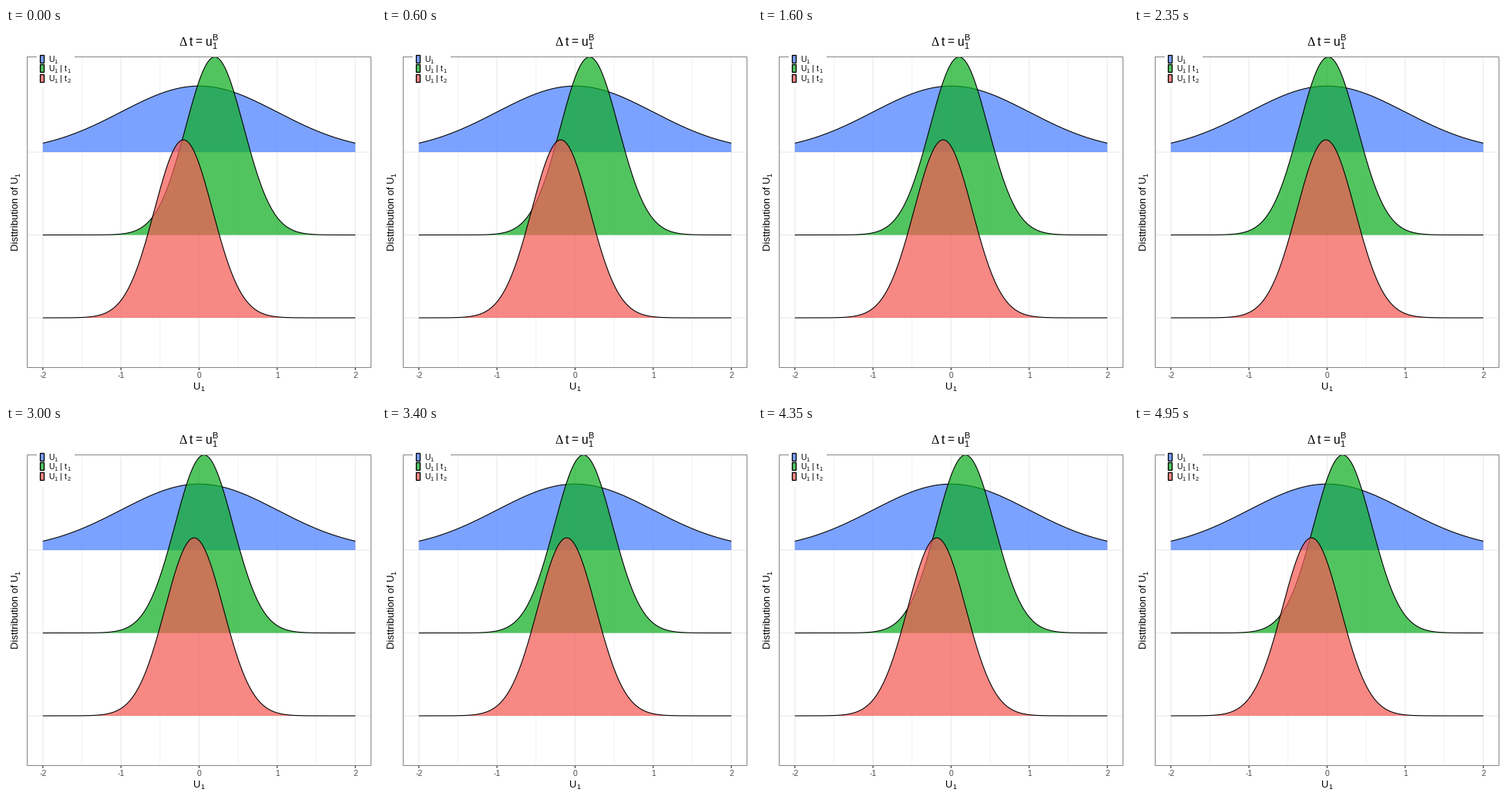
A matplotlib script that plays this animation: 480x480 px, repeating every 5 s.

```python
import numpy as np
import matplotlib.pyplot as plt
from matplotlib.animation import FuncAnimation
from matplotlib.patches import Rectangle

plt.rcParams["font.family"] = "Liberation Sans"

SIZE, DPI = 480, 72          # one point equals one pixel
FRAMES, INTERVAL = 100, 50
LEFT, RIGHT, TOP, BOTTOM = 27.5, 473.5, 37.6, 440.5
STEP = 107.5                 # distance between two baselines
BASELINES = [BOTTOM - (0.6 + n) * STEP for n in (2, 1, 0)]
COLORS = ("#487fff", "#0fae21", "#f55a55")
ALPHA = 0.72
SIGMA = 0.3714               # spread of the two narrow curves
SHIFT = 0.2                  # largest offset of their centres
PEAK = (BASELINES[1] - TOP) * SIGMA   # height of the unit normal

fig = plt.figure(figsize=(SIZE / DPI, SIZE / DPI), dpi=DPI, facecolor="white")
ax = fig.add_axes([0, 0, 1, 1])
ax.set_xlim(0, SIZE)
ax.set_ylim(SIZE, 0)
ax.axis("off")


def px(u):
    return 250.5 + 101.36 * u


def line(x0, y0, x1, y1, color, width, z):
    ax.plot([x0, x1], [y0, y1], color=color, lw=width, zorder=z,
            solid_capstyle="butt", snap=False)


def text(x, y, s, size, color="black", **kw):
    kw = {"ha": "left", "va": "baseline", "zorder": 12, **kw}
    ax.text(x, y, s, fontsize=size, color=color, **kw)


def draw_panel():
    for u in (-2, -1, 0, 1, 2):
        line(px(u), TOP, px(u), BOTTOM, "#ebebeb", 1.26, 1)
        line(px(u), BOTTOM, px(u), BOTTOM + 3.2, "#333333", 1.26, 7)
        text(px(u), 454.3, str(u), 10.4, "#4d4d4d", ha="center")
    for u in (-1.5, -0.5, 0.5, 1.5):
        line(px(u), TOP, px(u), BOTTOM, "#ebebeb", 0.63, 1)
    for y in BASELINES:
        line(LEFT, y, RIGHT, y, "#ebebeb", 1.26, 1)
    # whole numbers snap the border onto single pixel rows
    x, y = int(LEFT), int(TOP)
    ax.add_patch(Rectangle((x, y), int(RIGHT) - x, int(BOTTOM) - y, fill=False,
                           ec="#858585", lw=1, zorder=8))


def draw_legend():
    ax.add_patch(Rectangle((40, 32), 49, 46, fc="white", ec="none", zorder=10))
    for i, (top, color) in enumerate(zip((35, 47, 60), COLORS)):
        box = (44, top), 5, 10
        ax.add_patch(Rectangle(*box, fc=color, ec="none", alpha=ALPHA, zorder=11))
        ax.add_patch(Rectangle(*box, fill=False, ec="black", lw=1.3, zorder=12))
        base = top + 9.1
        text(55, base, "U", 10.4)
        text(62.6, base + 2, "1", 7.4)
        if i:
            text(69.6, base, "|", 10.4)
            text(75.8, base, "t", 10.4)
            text(79.2, base + 2, str(i), 7.4)


def draw_titles():
    text(224.2, 22.8, "Δ", 16, family="Liberation Serif")
    text(238, 22.8, "t", 15.6)
    text(245.6, 22.8, "=", 15.6)
    text(258.6, 22.8, "u", 15.6)
    text(267.6, 16, "B", 11)
    text(267.6, 27.3, "1", 11)
    text(243, 468.8, "U", 13)
    text(252.4, 471.2, "1", 9.1)
    side = dict(rotation=90, rotation_mode="anchor")
    text(16, 288.6, "Disttribution of U", 13, **side)
    text(18.3, 192.6, "1", 9.1, **side)


class Ridge:
    """A normal density standing on its own baseline."""

    u = np.linspace(-2, 2, 401)

    def __init__(self, base, color, sigma, z):
        self.base, self.sigma = base, sigma
        self.fill, = ax.fill([0, 0], [0, 0], fc=color, ec="none",
                             alpha=ALPHA, zorder=z)
        self.edge, = ax.plot([], [], color="black", lw=1.07, zorder=z + 0.1,
                             solid_capstyle="butt")

    def move(self, mean):
        bell = np.exp(-0.5 * ((self.u - mean) / self.sigma) ** 2)
        x, y = px(self.u), self.base - PEAK / self.sigma * bell
        self.edge.set_data(x, y)
        outline = np.column_stack([x, y])
        feet = [(x[-1], self.base), (x[0], self.base)]
        self.fill.set_xy(np.vstack([outline, feet]))


draw_panel()
draw_legend()
draw_titles()
prior, first, second = (
    Ridge(base, color, sigma, 3 + i)
    for i, (base, color, sigma) in enumerate(
        zip(BASELINES, COLORS, (1, SIGMA, SIGMA)))
)
prior.move(0)


def update(k):
    # the centres meet halfway and part again, slowing towards the ends
    s = abs(1 - 2 * k / (FRAMES - 1))
    mean = SHIFT * s * (3 - s * s) / 2
    first.move(mean)
    second.move(-mean)
    return first.fill, first.edge, second.fill, second.edge


anim = FuncAnimation(fig, update, frames=FRAMES, interval=INTERVAL,
                     repeat=True, repeat_delay=0, blit=False)
plt.show()
```
